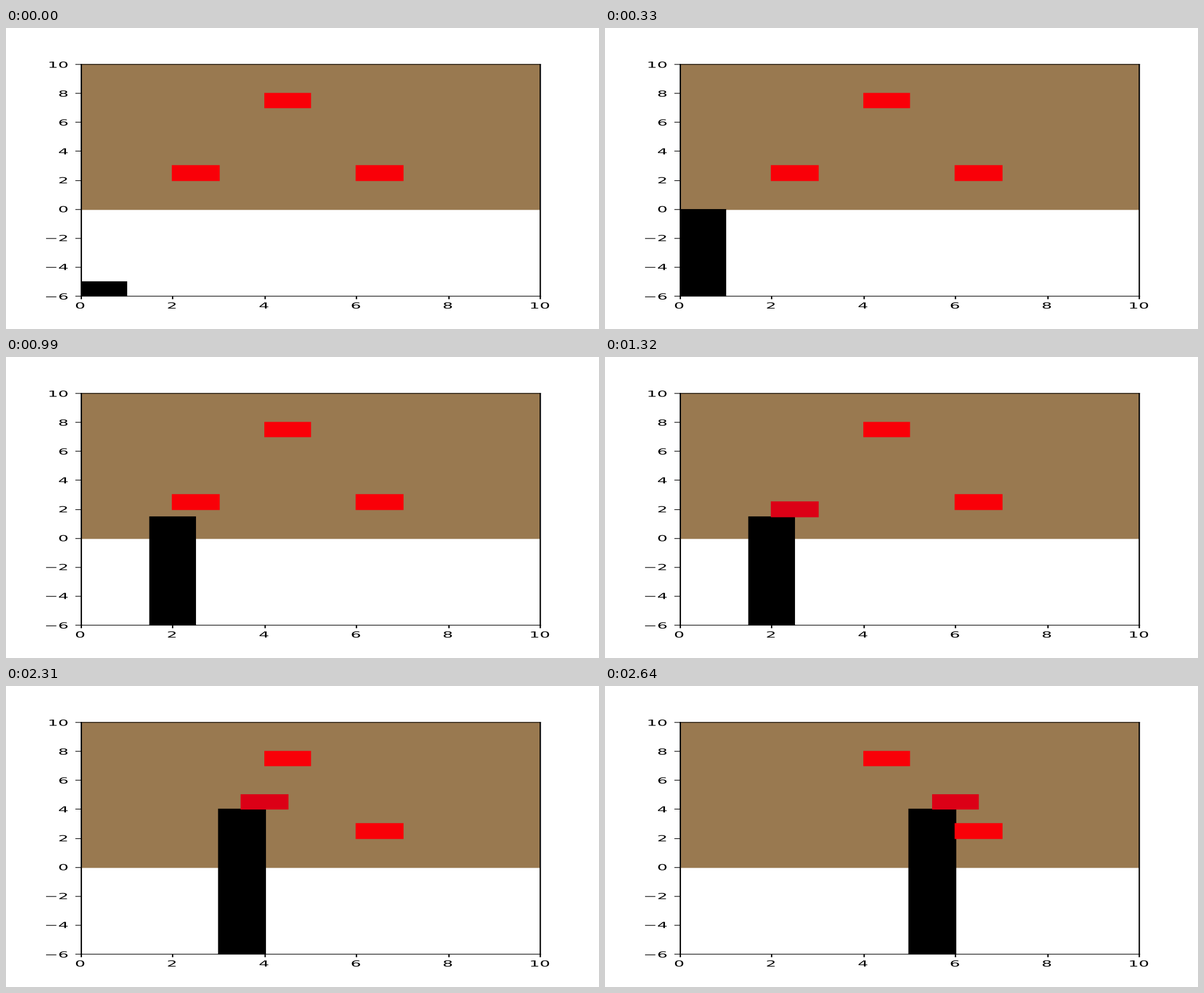
A matplotlib script that plays this animation: 1008x512 px, repeating every 3300 ms.

```python
import math

import matplotlib.pyplot as plt
from matplotlib.animation import FuncAnimation
from matplotlib.patches import PathPatch, Rectangle
from matplotlib.textpath import TextPath
from matplotlib.transforms import Affine2D

# The scene is laid out on a square 500 x 500 canvas that fills the wide stage.
SIZE = 500
LEFT, RIGHT, TOP, BOTTOM = 62.5, 450, 60, 445
PT = 100 / 72
EDGE = 0.5 * PT
SPINE = 0.4 * PT
TICK = 5
FONT = 10 * PT
BROWN, RED, HELD = "#997950", "#f90008", "#dc0016"

fig = plt.figure(figsize=(10.08, 5.12), dpi=100, facecolor="white")
ax = fig.add_axes([0, 0, 1, 1])
ax.set_xlim(0, SIZE)
ax.set_ylim(SIZE, 0)
ax.axis("off")


def px(x):
    return LEFT + (RIGHT - LEFT) * x / 10


def py(y):
    return TOP + (BOTTOM - TOP) * (10 - y) / 16


def snap(v):
    return math.floor(v + 0.5) + 0.5


def place(rect, x0, y0, x1, y1):
    rect.set_bounds(x0, y0, x1 - x0, y1 - y0)


def block(color, z):
    rect = Rectangle((0, 0), 1, 1, fc=color, lw=0, snap=False, zorder=z)
    ax.add_patch(rect)
    rect.set_clip_path(window)
    return rect


def put(rect, x, y, w, h):
    place(rect, snap(px(x)) - EDGE, snap(py(y + h)) - EDGE,
          snap(px(x + w)) + EDGE, snap(py(y)) + EDGE)


def line(x0, y0, x1, y1):
    rect = Rectangle((0, 0), 1, 1, fc="black", lw=0, snap=False, zorder=5)
    place(rect, x0, y0, x1, y1)
    ax.add_patch(rect)


def label(value, x, baseline, align):
    text = str(value).replace("-", "\u2212")
    advance = FONT * sum(0.838 if c == "\u2212" else 0.636 for c in text)
    path = TextPath((0, 0), text, size=FONT, prop={"family": "DejaVu Sans"})
    move = Affine2D().scale(1, -1).translate(x - advance * align, baseline)
    ax.add_patch(PathPatch(move.transform_path(path), fc="black", lw=0,
                           snap=False, zorder=6))


window = Rectangle((63, TOP), RIGHT - 63 + 0.5, BOTTOM - TOP + 0.5,
                   fc="none", lw=0)
ax.add_patch(window)

put(block(BROWN, 1), 0, 0, 10, 10)
arm = block("black", 2)
for pos in ((4, 7), (6, 2)):
    put(block(RED, 3), *pos, 1, 1)
cargo = block(RED, 4)

x0, x1, y0, y1 = snap(LEFT), snap(RIGHT), snap(TOP), snap(BOTTOM)
for x in (x0, x1):
    line(x - SPINE, y0 - SPINE, x + SPINE, y1 + SPINE)
for y in (y0, y1):
    line(x0 - SPINE, y - SPINE, x1 + SPINE, y + SPINE)
for v in range(0, 11, 2):
    x = snap(px(v))
    line(x - SPINE, y1, x + SPINE, y1 + TICK)
    label(v, px(v), 466, 0.5)
for v in range(-6, 11, 2):
    y = snap(py(v))
    line(x0 - TICK, y - SPINE, x0, y + SPINE)
    label(v, LEFT - 7 * PT, math.floor(py(v) + 6), 1)

# Arm position (left, tip) at each step.
ROUTE = [(0, -5), (0, 0), (1.5, 0), (1.5, 1.5), (1.5, 1.5), (1.5, 1.5),
         (3, 1.5), (3, 4), (5, 4), (5, 4)]
GRAB = 4


def draw(i):
    x, tip = ROUTE[i]
    put(arm, x, -6, 1, tip + 6)
    if i < GRAB:
        put(cargo, 2, 2, 1, 1)
        cargo.set_facecolor(RED)
    else:
        put(cargo, x + 0.5, tip, 1, 1)
        cargo.set_facecolor(HELD)
    return arm, cargo


anim = FuncAnimation(fig, draw, frames=len(ROUTE), interval=330,
                     repeat=True, repeat_delay=0)
plt.show()
```
